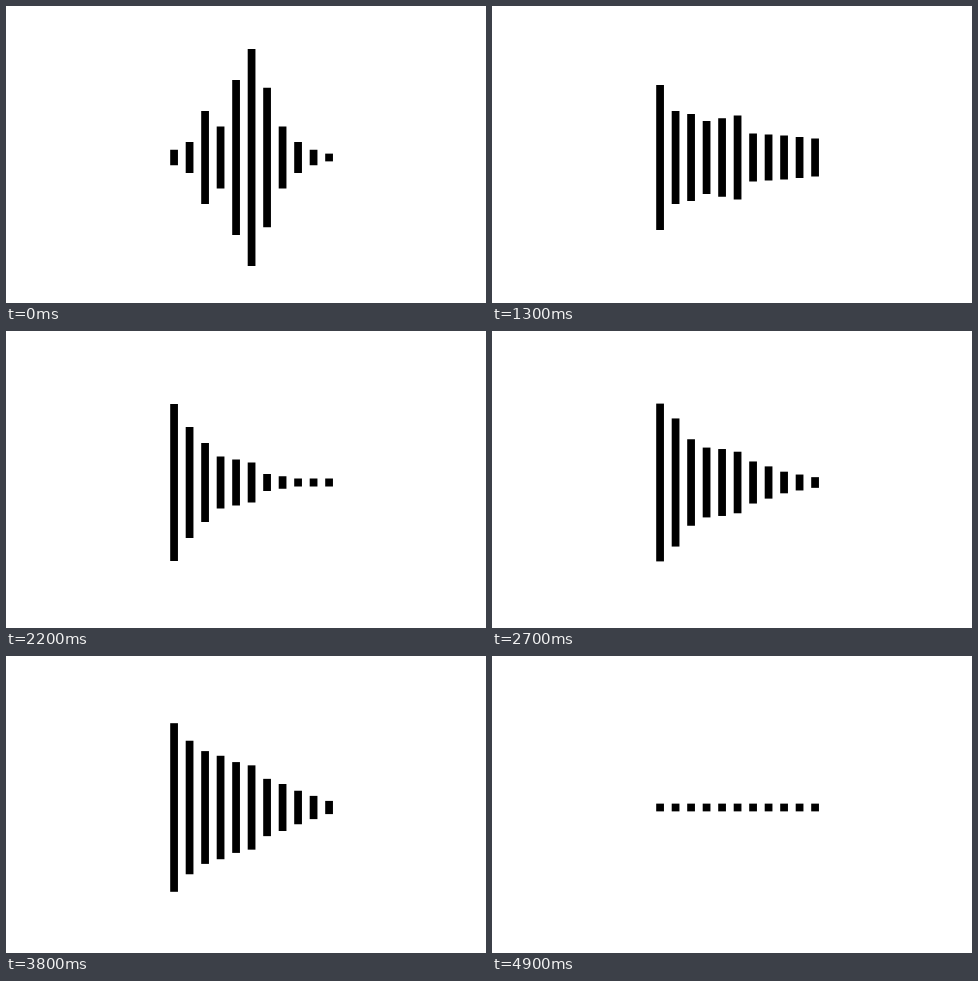
Recreate the animation shown at these times as an HTML page. Size 480 px wide and 297 px high, loop 5000 ms.

```html
<!DOCTYPE html>
<html lang="en">
<head>
<meta charset="utf-8">
<title>Sound bars</title>
<style>
  html, body { margin: 0; width: 100%; height: 100%; overflow: hidden; background: #fff; }
  svg { display: block; width: 100%; height: 100%; }
</style>
</head>
<body>
<svg viewBox="0 0 480 297"><g id="bars" fill="#000"></g></svg>
<script>
const LOOP = 5000, STEP = 100;
const UNIT = 7.75, LEFT = 164.2, MID = 151.5;
const PEAK = 44, FALL = 32.5;

// Resting icon, in units of bar width
const icon = [2, 4, 12, 8, 20, 28, 18, 8, 4, 2, 1];

// Spectrum shapes: levels at a few bars, and how far the sound swells afterwards
const points = [0, 1, 2, 3, 5, 6, 8, 10];
const poses = [
  { at: 5, swell: 0.12, levels: [145, 103, 75, 86, 71, 51, 45, 27] },
  { at: 13, swell: 0.1, levels: [145, 93, 87, 73, 84, 48, 44, 38] },
  { at: 22, swell: 0.07, levels: [157, 111, 79, 52, 40, 17, 8, 8] },
  { at: 33, swell: 0.3, levels: [137, 133, 89, 84, 81, 69, 35, 13] },
  { at: 42, swell: 0.13, levels: [138, 103, 93, 77, 66, 26, 24, 8] }
];
const first = poses[0], last = poses[poses.length - 1];

const mix = (a, b, u) => a + (b - a) * u;

function level(pose, i) {
  const n = Math.max(1, points.findIndex(p => p >= i));
  const u = (i - points[n - 1]) / (points[n] - points[n - 1]);
  return mix(pose.levels[n - 1], pose.levels[n], u);
}

function height(step, i) {
  if (step === 0) return icon[i] * UNIT;
  if (step < first.at) {
    const rest = 1 - step / first.at;
    return level(first, i) * (1 - rest * rest);
  }
  if (step >= last.at) {
    const rise = Math.min(1, (step - last.at) / (PEAK - last.at));
    const fall = FALL * Math.max(0, step - PEAK);
    return level(last, i) * (1 + last.swell * rise) - fall;
  }
  const n = poses.findIndex(pose => pose.at > step);
  const from = poses[n - 1], to = poses[n];
  const u = (step - from.at) / (to.at - from.at);
  const flicker = 0.75 + 0.25 * Math.sin(step * 1.9 + i * 1.7);
  const gain = 1 + from.swell * flicker * Math.sin(Math.PI * u);
  return mix(level(from, i), level(to, i), u) * gain;
}

const group = document.getElementById("bars");
const bars = icon.map((_, i) => {
  const bar = document.createElementNS("http://www.w3.org/2000/svg", "rect");
  bar.setAttribute("x", LEFT + i * 2 * UNIT);
  bar.setAttribute("width", UNIT);
  return group.appendChild(bar);
});

function draw(time) {
  const step = Math.floor((time % LOOP) / STEP);
  bars.forEach((bar, i) => {
    const h = Math.max(UNIT, height(step, i));
    bar.setAttribute("y", MID - h / 2);
    bar.setAttribute("height", h);
  });
}

const start = performance.now();
function tick() {
  draw(performance.now() - start);
  requestAnimationFrame(tick);
}
tick();
</script>
</body>
</html>
```
